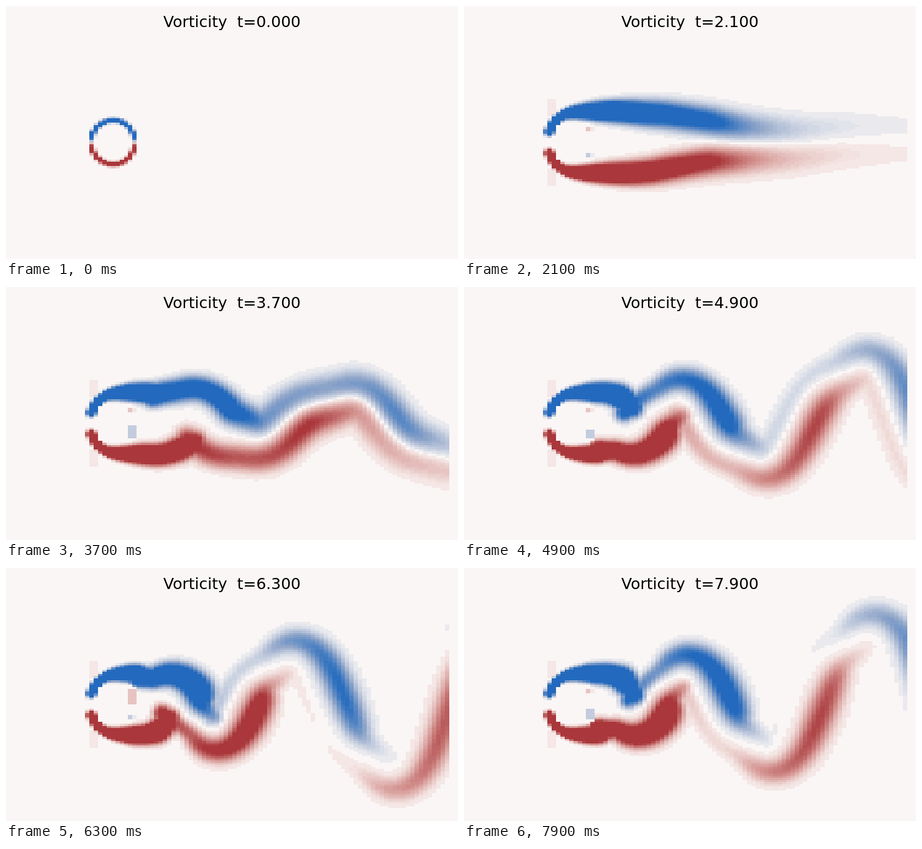
Recreate the animation shown at these times as an HTML page with a canvas. Size 727 by 408 pixels, loop 8000 ms.

```html
<!DOCTYPE html>
<html lang="en">
<head>
<meta charset="utf-8">
<title>Vorticity</title>
<style>
html, body { margin: 0; width: 100%; height: 100%; overflow: hidden; background: #faf6f5; }
canvas, svg { position: absolute; left: 0; top: 0; }
text { font: 25px "DejaVu Sans", sans-serif; text-anchor: middle; white-space: pre; }
</style>
</head>
<body>
<canvas id="stage" width="727" height="408"></canvas>
<svg width="727" height="408"><text id="title" x="363.5" y="34"></text></svg>
<script>
const ctx = document.getElementById('stage').getContext('2d');
const title = document.getElementById('title');
const N = 100, X0 = 15, Y0 = 45.2, DX = 6.98, DY = 3.49;
const MID = Y0 + 50 * DY, BODY_X = 172, TAU = 2 * Math.PI;
const CALM = [250, 246, 245];
const BLUE = [CALM, [147, 168, 202], [35, 105, 189]];
const RED = [CALM, [214, 154, 150], [169, 55, 59]];

const clamp = (v, lo = 0, hi = 1) => Math.min(hi, Math.max(lo, v));
const mix = (a, b, k) => a + (b - a) * k;
const smooth = (a, b, v) => { const k = clamp((v - a) / (b - a)); return k * k * (3 - 2 * k); };
const bell = (v, w) => Math.exp(-((v / w) ** 2));

const swayGrowth = t => smooth(1.6, 6.1, t);
const rollUp = t => smooth(3, 6, t);

// Position within the shedding cycle, -.5 to .5: vortices leave slowly, then ride the stream
function phase(x, t, shift) {
  const age = .0029 * (x - 85) - .55 * Math.exp((240 - x) / 75);
  const p = age - t - shift + .1 * (1 - rollUp(t));
  return p - Math.floor(p + .5);
}

// Height of the wavy line that separates the two shear layers
function divide(x, t, shift) {
  const a = TAU * (phase(x, t, shift) + .27);
  const size = .22 * (x - 135) * smooth(190, 350, x) * swayGrowth(t);
  return MID - size * Math.cos(a + .6 * Math.sin(a) ** 2);
}

// One point of the upper layer's ridge, set off from the dividing line along its normal
function ridge(x, t, shift) {
  const rolled = rollUp(t) * smooth(200, 300, x);
  const vortex = bell(phase(x, t, shift) + .1 * rolled, .2);
  const slope = (divide(x + 1, t, shift) - divide(x - 1, t, shift)) / 2;
  const len = Math.hypot(1, slope);

  const wrap = 1 - Math.exp((131 - x) / 14);
  const sheet = wrap * (20 + 30 / (1 + (Math.max(0, x - 180) / 200) ** 4));
  const gap = mix(sheet, 20 + 20 * vortex, rolled);
  const thick = Math.max(7, 23 * (1 - Math.exp((125 - x) / 90)));

  const reach = Math.max(0, x - 200) / Math.max(1, 245 * t);
  const start = 2.2 / (1 + (reach / .4) ** 4);
  const decay = .75 + 1.75 * Math.exp((200 - x) / 150);
  const feed = Math.min(1, Math.exp((230 - x) / 90));
  const gain = mix(1, mix(feed, 1, vortex), swayGrowth(t));
  return {
    px: x + gap * slope / len,
    py: divide(x, t, shift) - gap / len,
    w: mix(thick, 12 + 12 * vortex, rolled) * mix(.6, 1, clamp(t / 1.5)),
    s: Math.min(start, decay) * gain * clamp(t / .3),
    n: 2 + Math.min(1, Math.exp((200 - x) / 100))
  };
}

function splat(field, t, lower) {
  for (let x = 137; x < 800; x += 2) {
    const { px, py, w, s, n } = ridge(x, t, lower ? .5 : 0);
    if (s < .03) continue;
    const cy = lower ? 2 * MID - py : py, r = 2.2 * w;
    const c1 = Math.min(N - 1, Math.floor((px + r - X0) / DX));
    const r1 = Math.min(N - 1, Math.floor((cy + r - Y0) / DY));
    for (let c = Math.max(0, Math.floor((px - r - X0) / DX)); c <= c1; c++)
      for (let row = Math.max(0, Math.floor((cy - r - Y0) / DY)); row <= r1; row++) {
        const d = Math.hypot(X0 + (c + .5) * DX - px, Y0 + (row + .5) * DY - cy);
        const v = s * Math.exp(-((d / w) ** n)), i = row * N + c;
        if (v > field[i]) field[i] = v;
      }
  }
}

function vorticity(t) {
  const up = new Float32Array(N * N), down = new Float32Array(N * N);
  splat(up, t, false);
  splat(down, t, true);
  const ring = clamp(1 - t / .4);
  // Backflow on the rear wall alternates between the two sides
  const swing = swayGrowth(t) * Math.sin(TAU * (t + .05));
  return down.map((d, i) => {
    const col = i % N, row = Math.floor(i / N);
    const x = X0 + (col + .5) * DX, dy = Y0 + (row + .5) * DY - MID;
    const wall = ring * 1.8 * bell(Math.hypot(x - BODY_X, dy) - 35.5, 3.5) * clamp(dy / 10, -1, 1);
    const inside = ((x - 179) / 34.5) ** 4 + (dy / 32) ** 4 < 1;
    const v = wall + (inside ? 0 : d - up[i]);
    if (t > .3 && (col === 26 || col === 27)) {
      const side = Math.sign(-dy), from = 24 - Math.abs(dy);
      const reach = 7 + 28 * Math.max(0, side * swing);
      if (from > 0 && from < reach) return side * (col === 26 || reach > 14 ? .26 : .07);
    }
    // Faint halo ahead of the body
    const far = Math.abs(dy);
    const halo = t > .3 && (col === 17 || col === 18) && far > 42 && far < 70;
    return halo && Math.abs(v) < .05 ? .06 : v;
  });
}

function colour(v) {
  const map = v < 0 ? BLUE : RED;
  const a = Math.min(1, Math.abs(v));
  const k = 2 * (a < .1 ? .08 : Math.round(a * 26) / 26), i = k < 1 ? 0 : 1;
  return `rgb(${map[i].map((c, j) => Math.round(mix(c, map[i + 1][j], k - i)))})`;
}

function draw(t) {
  ctx.fillStyle = '#faf6f5';
  ctx.fillRect(0, 0, 727, 408);
  vorticity(t).forEach((v, i) => {
    if (Math.abs(v) < .04) return;
    const c = i % N, r = Math.floor(i / N);
    const x = Math.round(X0 + c * DX), y = Math.round(Y0 + r * DY);
    ctx.fillStyle = colour(v);
    ctx.fillRect(x, y, Math.round(X0 + (c + 1) * DX) - x, Math.round(Y0 + (r + 1) * DY) - y);
  });
  title.textContent = `Vorticity  t=${t.toFixed(3)}`;
}

let last = -1;
function tick() {
  const step = Math.floor(performance.now() % 8000 / 100);
  if (step !== last) draw((last = step) / 10);
  requestAnimationFrame(tick);
}
tick();
</script>
</body>
</html>
```
